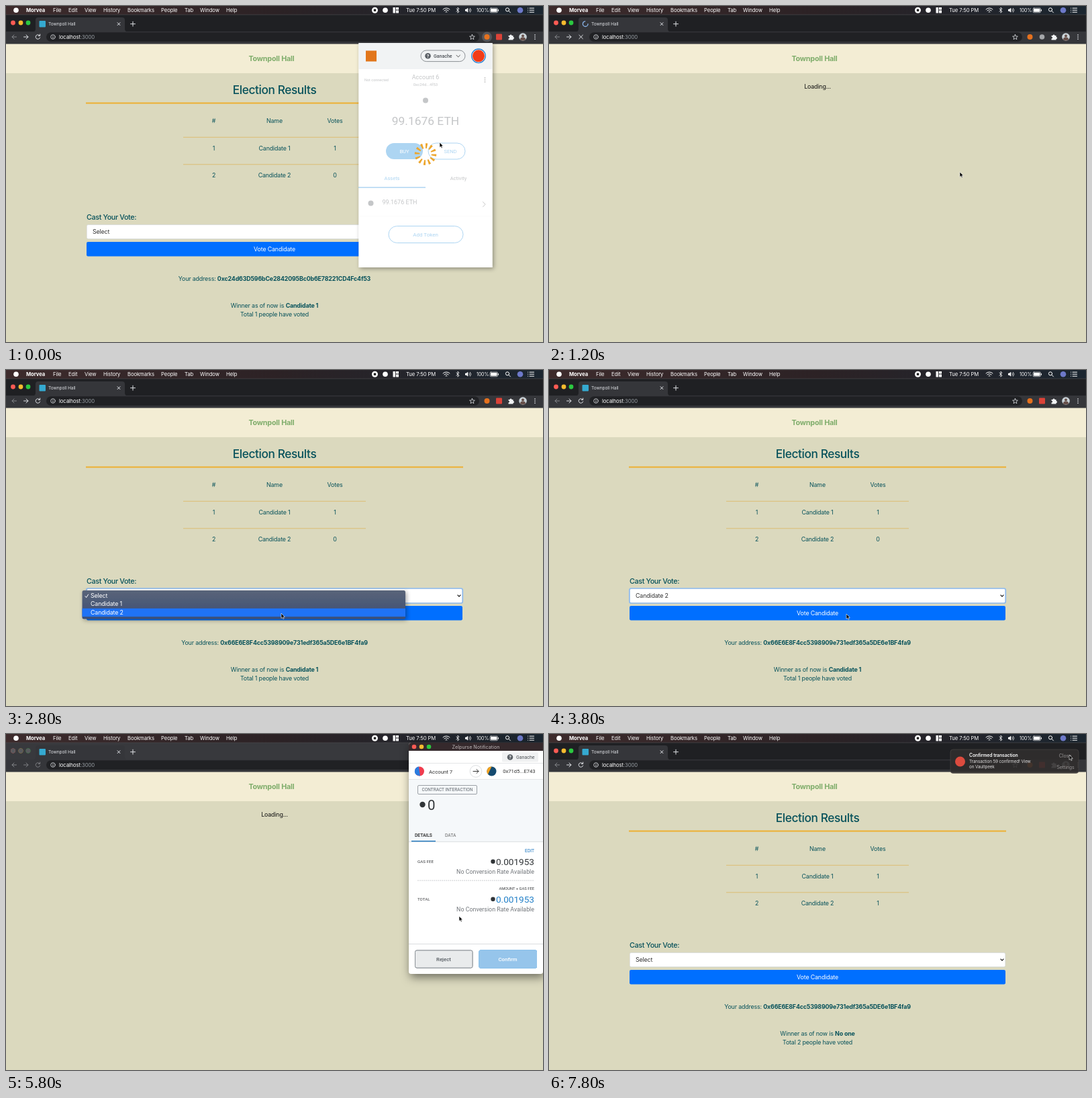
An HTML page for the animation above (8000 ms loop, 800x500 px).

```html
<!DOCTYPE html>
<html lang="en">
<head>
<meta charset="utf-8">
<title>Townpoll Hall</title>
<style>
html, body { margin: 0; width: 100%; height: 100%; overflow: hidden; background: #dbd9be }
svg { display: block; width: 100vw; height: 100vh }
text { font-family: Inter, "Open Sans", sans-serif; white-space: pre }
.ui { font-size: 7.7px; letter-spacing: -.1px; fill: #fff }
.page { font-size: 8.89px; letter-spacing: -.17px; fill: #07525b }
.wallet text { font-family: Roboto, "Open Sans", sans-serif }
.mid { text-anchor: middle }
.end { text-anchor: end }
.bold { font-weight: 700 }
.line { fill: none; stroke-linecap: round; stroke-linejoin: round }

/* The whole loop runs on a 200 ms beat: 2.5% of 8 s. */
.t { opacity: 0; animation: 8s step-end -5ms infinite }
.results { animation-name: results }
.oldAddr { animation-name: oldAddr }
.newAddr { animation-name: newAddr }
.before { animation-name: before }
.after { animation-name: after }
.popup { animation-name: popup }
.busy { animation-name: busy }
.ready { animation-name: ready }
.reload { animation-name: reload }
.steady { animation-name: steady }
.focus { animation-name: focus }
.unpicked { animation-name: unpicked }
.picked { animation-name: picked }
.menu { animation-name: menu }
.blur { animation-name: blur }
.nav { animation-name: nav }
.zoom { animation-name: zoom }
.window { animation-name: window }
.sent { animation-name: sent }
.notice { animation-name: notice }
.hover { animation-name: hover }
.row { animation: row 8s step-end -5ms infinite }
.cursor { animation: cursor 8s -5ms infinite }
.spin { transform-box: fill-box; transform-origin: center; animation: spin 1.2s steps(6) infinite }

@keyframes results { 0%, 20%, 87.5% { opacity: 1 } 12.5%, 50% { opacity: 0 } }
@keyframes oldAddr { 0% { opacity: 1 } 12.5% { opacity: 0 } }
@keyframes newAddr { 0% { opacity: 0 } 12.5% { opacity: 1 } }
@keyframes before { 0% { opacity: 1 } 87.5% { opacity: 0 } }
@keyframes after { 0% { opacity: 0 } 87.5% { opacity: 1 } }
@keyframes popup { 0% { opacity: 1 } 10% { opacity: 0 } }
@keyframes busy { 0% { opacity: 1 } 5% { opacity: 0 } }
@keyframes ready { 0% { opacity: 0 } 5% { opacity: 1 } }
@keyframes reload { 0%, 20% { opacity: 0 } 12.5% { opacity: 1 } }
@keyframes steady { 0%, 20% { opacity: 1 } 12.5% { opacity: 0 } }
@keyframes focus { 0%, 50% { opacity: 0 } 30% { opacity: 1 } }
@keyframes unpicked { 0%, 50% { opacity: 1 } 40% { opacity: 0 } }
@keyframes picked { 0%, 50% { opacity: 0 } 40% { opacity: 1 } }
@keyframes menu { 0%, 40% { opacity: 0 } 30% { opacity: 1 } }
@keyframes row { 0% { transform: none } 32.5% { transform: translateY(12.3px) } 35% { transform: translateY(24.8px) } }
@keyframes blur { 0%, 77.5% { opacity: 0 } 57.5% { opacity: 1 } }
@keyframes nav { 0%, 87.5% { opacity: 1 } 57.5% { opacity: .42 } }
@keyframes zoom { 0%, 62.5% { opacity: 0 } 60% { opacity: 1 } }
@keyframes window { 0%, 77.5% { opacity: 0 } 62.5% { opacity: 1 } }
@keyframes sent { 0% { opacity: 0 } 70% { opacity: 1 } }
@keyframes notice {
  0% { opacity: 0 }
  87.5% { opacity: 1; transform: translateX(110px) }
  90% { opacity: 1; transform: none }
}
@keyframes hover { 0% { opacity: 0 } 95% { opacity: 1 } }
@keyframes spin { to { transform: rotate(360deg) } }
@keyframes cursor {
  0%, 5% { transform: translate(646px, 203px); animation-timing-function: steps(2) }
  10%, 20% { transform: translate(612px, 247px); animation-timing-function: steps(4) }
  30% { transform: translate(420px, 336px); animation-timing-function: steps(2) }
  35%, 40% { transform: translate(410px, 362px); animation-timing-function: steps(2) }
  45%, 62.5% { transform: translate(443px, 363px); animation-timing-function: steps(2) }
  67.5%, 70% { transform: translate(745px, 331px); animation-timing-function: steps(1) }
  72.5% { transform: translate(675px, 271px); animation-timing-function: steps(4) }
  82.5%, 90% { transform: translate(600px, 246px); animation-timing-function: steps(3) }
  97.5%, 100% { transform: translate(775px, 31px) }
}
</style>
</head>
<body>
<svg viewBox="0 0 800 500" preserveAspectRatio="none">
  <defs>
    <linearGradient id="bar"><stop stop-color="#3d2b2c"/><stop offset=".5" stop-color="#2c2225"/><stop offset="1" stop-color="#1b2630"/></linearGradient>
    <linearGradient id="list" x2="0" y2="1"><stop stop-color="#596479"/><stop offset="1" stop-color="#3c4e74"/></linearGradient>
    <filter id="shadow" x="-20%" y="-20%" width="140%" height="140%"><feDropShadow dy="5" stdDeviation="7" flood-opacity=".5"/></filter>
    <filter id="soft" x="-10%" y="-30%" width="120%" height="180%"><feDropShadow dy="2" stdDeviation="3" flood-opacity=".35"/></filter>
    <g id="duo"><circle r="7" fill="#f03c4e"/><path d="M-1-7A7 7 0 0 0-4 5.8L1 7Z" fill="#2b7de0"/></g>
    <g id="help"><circle r="4.3" fill="#5b6066"/><text class="mid bold" y="2.3" font-size="6.5" fill="#fff">?</text></g>
    <g id="lights"><circle cx="10.5" cy="25"  r="3.4"/><circle cx="22" cy="25" r="3.4"/><circle cx="33" cy="25" r="3.4"/></g>
  </defs>

  <!-- Page -->
  <rect width="800" height="500" fill="#dbd9be"/>
  <rect y="56" width="800" height="44" fill="#f3edd4"/>
  <text class="mid bold" x="395.5" y="82" font-size="10.8" letter-spacing="-.2" fill="#7fad6b">Townpoll Hall</text>
  <text class="page mid" x="400" y="123.3" style="fill:#111">Loading...</text>

  <g class="t results page">
    <rect y="100" width="800" height="400" fill="#dbd9be"/>
    <text class="mid" x="400" y="130.5" font-size="17.3" letter-spacing="-.4" font-weight="500">Election Results</text>
    <path d="M119 144.5H681" stroke="#edb033" stroke-width="2.2"/>
    <path d="M264 195.3H536M264 235.8H536" stroke="#dcbd72"/>
    <g class="mid">
      <text x="309.5" y="174">#</text><text x="400" y="174">Name</text><text x="490" y="174">Votes</text>
      <text x="309.5" y="214.6">1</text><text x="400" y="214.6">Candidate 1</text><text x="490" y="214.6">1</text>
      <text x="309.5" y="255">2</text><text x="400" y="255">Candidate 2</text>
      <text class="t oldAddr" x="400" y="409">Your address: <tspan class="bold">0xc24d63D596bCe2842095Bc0b6E78221CD4Fc4f53</tspan></text>
      <text class="t newAddr" x="400" y="409">Your address: <tspan class="bold">0x66E6E8F4cc5398909e731edf365a5DE6e1BF4fa9</tspan></text>
      <g class="t before">
        <text x="490" y="255">0</text>
        <text x="400" y="449">Winner as of now is <tspan class="bold">Candidate 1</tspan></text>
        <text x="400" y="462.3">Total 1 people have voted</text>
      </g>
      <g class="t after">
        <text x="490" y="255">1</text>
        <text x="400" y="449">Winner as of now is <tspan class="bold">No one</tspan></text>
        <text x="400" y="462.3">Total 2 people have voted</text>
      </g>
    </g>
    <text x="120" y="318.3" font-size="10.8" letter-spacing="-.38" font-weight="500">Cast Your Vote:</text>
    <rect x="120.3" y="325.5" width="559.5" height="21" rx="2.2" fill="#fff" stroke="#ced4da" stroke-width=".6"/>
    <rect class="t focus" x="119.8" y="325" width="560.5" height="22" rx="2.5" fill="none" stroke="#8fbcf0" stroke-width="1.7"/>
    <g fill="#333"><text class="t unpicked" x="129" y="339.3">Select</text><text class="t picked" x="129" y="339.3">Candidate 2</text></g>
    <path class="line" d="M673 335l2 2.2 2-2.2" stroke="#222" stroke-width="1.2"/>
    <rect x="120" y="351" width="560" height="21.5" rx="2.2" fill="#006fff"/>
    <text class="mid" x="400" y="365.2" fill="#fff">Vote Candidate</text>

    <g class="t menu">
      <rect x="113.5" y="328" width="481.5" height="42.5" rx="2.5" fill="url(#list)" filter="url(#soft)"/>
      <rect class="row" x="113.5" y="330" width="481.5" height="12.3" fill="#1f73f6"/>
      <g fill="#fff">
        <path class="line" d="M118 336.6l1.6 2 3-4.6" stroke="#fff"/>
        <text x="126" y="339.2">Select</text><text x="126" y="351.4">Candidate 1</text><text x="126" y="363.7">Candidate 2</text>
      </g>
    </g>
  </g>

  <!-- Browser frame -->
  <rect y="13" width="800" height="26" fill="#1f2023"/>
  <rect class="t blur" y="13" width="800" height="26" fill="#38393d"/>
  <path d="M40 38.5Q44 38 44 34V21Q44 17 48 17H173Q177 17 177 21V34Q177 38 181 38.5Z" fill="#35363a"/>
  <rect y="38" width="800" height="18.5" fill="#35363a"/>
  <rect x="60" y="39.2" width="645" height="13.8" rx="6.9" fill="#202124"/>
  <circle cx="10.5" cy="25" r="3.4" fill="#fb5b54"/><circle cx="22" cy="25" r="3.4" fill="#f6bb2f"/><circle cx="33" cy="25" r="3.4" fill="#2bc840"/>
  <use href="#lights" class="t blur" fill="#58595d"/>
  <rect class="t steady" x="49.5" y="22" width="9.5" height="9.5" rx="1" fill="#35a9d0"/>
  <g class="t reload"><circle cx="54.2" cy="26.7" r="4.8" fill="#35363a"/><circle class="spin line" cx="54.2" cy="26.7" r="3.8" stroke="#8cb8ee" stroke-width="1.3" stroke-dasharray="17 7"/></g>
  <text class="ui" x="63" y="29.2" style="font-size:6.6px;fill:#dfe1e5">Townpoll Hall</text>
  <g class="line" stroke="#dfe1e5" stroke-width="1">
    <path d="M166 24.7l4 4m0-4l-4 4M185.5 26.7h7m-3.5-3.5v7"/>
    <path d="M15.5 46H9m3-3l-3 3 3 3" stroke="#85878b"/>
    <g class="t nav">
      <path d="M26.5 46H33m-3-3l3 3-3 3"/>
      <path class="t steady" d="M50.2 44a3.3 3.3 0 1 0 .5 3M50.7 42v2.4h-2.4"/>
      <path class="t reload" d="M44.8 43.2l5.6 5.6m0-5.6l-5.6 5.6"/>
    </g>
    <circle cx="70" cy="46" r="3.3" stroke-width=".8"/><path d="M70 45.8v2M70 44.2v.1" stroke-width=".9"/>
    <path d="M694.5 42.4l1.1 2.6 2.8.2-2.2 1.8.7 2.8-2.4-1.6-2.4 1.6.7-2.8-2.2-1.8 2.8-.2Z" stroke-width=".8"/>
  </g>
  <text class="ui" x="79" y="48.9">localhost<tspan fill="#9aa0a6">:3000</tspan></text>
  <circle class="t popup" cx="716.5" cy="46" r="7.5" fill="#55565a"/>
  <circle cx="716.5" cy="46" r="4" fill="#e5711e"/>
  <g class="t blur"><rect x="717" y="46.5" width="7" height="7" rx="1.5" fill="#1675d1"/><text class="mid ui" x="720.5" y="52.2" style="font-size:5.5px">1</text></g>
  <rect class="t steady" x="730" y="41.5" width="9" height="9" rx="1" fill="#dc4338"/>
  <circle class="t reload" cx="734.5" cy="46" r="3.8" fill="#a5a7aa"/>
  <path d="M748.5 44h2a1.5 1.5 0 1 1 3 0h2v2a1.5 1.5 0 1 1 0 3v1.5h-7v-2a1.5 1.5 0 0 0 0-3Z" fill="#f1f3f4"/>
  <circle cx="770" cy="46" r="5.8" fill="#c9d2d7"/><circle cx="770" cy="44.5" r="2" fill="#67504a"/><path d="M766 50a4 3.4 0 0 1 8 0Q770 53 766 50" fill="#67504a"/>
  <path class="line" d="M788 43v.1M788 46v.1M788 49v.1" stroke="#dfe1e5" stroke-width="1.7"/>

  <!-- Menu bar -->
  <rect width="800" height="13" fill="url(#bar)"/>
  <rect y="12.6" width="800" height=".7" fill="#49494d"/>
  <g class="ui">
    <circle cx="15" cy="6.2" r="3.8"/>
    <text class="bold" x="30" y="9">Morvea</text><text x="70" y="9">File</text><text x="93" y="9">Edit</text><text x="117" y="9">View</text>
    <text x="145" y="9">History</text><text x="181" y="9">Bookmarks</text><text x="231" y="9">People</text><text x="266" y="9">Tab</text>
    <text x="289" y="9">Window</text><text x="328" y="9">Help</text><text x="596" y="9">Tue 7:50 PM</text><text x="701" y="8.8" font-size="7" style="font-size:7px">100%</text>
    <circle cx="549.5" cy="6.2" r="4.5"/><rect x="547.8" y="4.5" width="3.4" height="3.4" rx=".6" fill="#222"/>
    <circle cx="565" cy="6.2" r="3.8"/>
    <path d="M576.5 2h3.6v8.5h-3.6ZM581 2h4v3.6h-4ZM581 6.6h4v3.9h-4Z"/>
    <path d="M684 4.8h1.8l2.4-2v7l-2.4-2H684Z"/>
    <rect x="722" y="4" width="9.5" height="4.8" rx=".8"/><rect x="733" y="5.3" width="1" height="2.2"/>
    <circle cx="766" cy="6.2" r="4.3" fill="#6d79c9"/>
    <g class="line" stroke="#fff" stroke-width="1">
      <path d="M651 5a7 7 0 0 1 10 0M652.8 7a4.5 4.5 0 0 1 6.4 0M655 8.8a1.8 1.8 0 0 1 2 0"/>
      <path d="M671 4l4 4.2-2 2V2.2l2 2-4 4" stroke-width=".8"/>
      <path d="M690 4.7a2.4 2.4 0 0 1 0 3.2M691.6 3.4a4.5 4.5 0 0 1 0 5.8" stroke-width=".8"/>
      <rect x="721" y="3" width="11.5" height="6.8" rx="1.5" stroke-width=".6"/>
      <circle cx="747" cy="5.4" r="2.6"/><path d="M749 7.4l2.5 2.5M777.5 3.2h.1M777.5 6.2h.1M777.5 9.2h.1M780 3.2h6.5M780 6.2h6.5M780 9.2h6.5"/>
    </g>
  </g>

  <!-- Wallet popup -->
  <g class="t popup wallet">
    <rect x="525.5" y="55" width="199" height="334" fill="#fff" filter="url(#soft)"/>
    <rect x="525.5" y="55" width="199" height="39" fill="#f1f3f4"/>
    <rect x="536" y="66.5" width="16" height="16" fill="#e2761b"/>
    <rect x="618" y="66" width="66" height="16.6" rx="8.3" fill="none" stroke="#71777c" stroke-width=".8"/>
    <use href="#help" x="628.5" y="74.3"/>
    <text x="637" y="76.8" font-size="7" fill="#4d5156" font-weight="500">Ganache</text>
    <path class="line" d="M671 73.2l2.7 2.7 2.7-2.7" stroke="#555"/>
    <circle cx="704" cy="74.3" r="10.3" fill="#fff" stroke="#2f86d4" stroke-width="1.4"/>
    <circle class="t busy" cx="704" cy="74.3" r="9" fill="#f33c18"/>
    <g class="t ready"><use href="#duo" transform="translate(704 74.3) scale(1.25)"/></g>
    <g class="mid" fill="#4a4f55">
      <text x="552" y="111.5" font-size="5.5">Not connected</text>
      <path class="line" d="M713.5 107v.1M713.5 110v.1M713.5 113v.1" stroke="#555" stroke-width="2"/>
      <circle cx="625" cy="140.5" r="4"/>
      <g class="t busy"><text x="625" y="109" font-size="9">Account 6</text><text x="625" y="118.5" font-size="6">0xc24d...4f53</text><text x="625" y="177.3" font-size="17.4">99.1676 ETH</text><text x="586.5" y="295.2" font-size="9">99.1676 ETH</text></g>
      <g class="t ready"><text x="625" y="109" font-size="9">Account 7</text><text x="625" y="118.5" font-size="6">0x66E6...4fa9</text><text x="625" y="177.3" font-size="17.4">100 ETH</text><text x="579" y="295.2" font-size="9">100 ETH</text></g>
      <rect x="566" y="204" width="55" height="24" rx="12" fill="#037dd6"/><text x="593.5" y="218.8" font-size="7.6" fill="#fff">BUY</text>
      <rect x="629" y="204" width="55" height="24" rx="12" fill="none" stroke="#037dd6"/><text x="662" y="218.8" font-size="7.6" fill="#037dd6">SEND</text>
      <text x="575" y="258.5" font-size="7.5" fill="#037dd6">Assets</text><text x="674" y="258.5" font-size="7.5">Activity</text>
      <path d="M525.5 270H625" stroke="#037dd6" stroke-width="1.5"/><path d="M525.5 313H724.5" stroke="#e4e6e8" stroke-width=".6"/>
      <circle cx="543.5" cy="293.5" r="4"/><path class="line" d="M710.5 291.5l3.5 3.7-3.5 3.7" stroke="#555"/>
      <rect x="570" y="327.5" width="111" height="25" rx="12.5" fill="none" stroke="#037dd6"/><text x="625" y="342.8" font-size="8" fill="#037dd6">Add Token</text>
    </g>
    <g class="t busy">
      <rect x="525.5" y="94" width="199" height="295" fill="#fff" opacity=".68"/>
      <g class="spin"><circle cx="625" cy="220.5" r="12.5" fill="none" stroke="#eda62d" stroke-width="7.5" pathLength="120" stroke-dasharray="4 6"/></g>
    </g>
  </g>

  <!-- Transaction window -->
  <rect class="t zoom" x="685" y="160" width="30" height="51" rx="1" fill="#bfbea8"/>
  <g class="t window wallet">
    <rect x="600" y="13" width="200" height="344" rx="4" fill="#fff" filter="url(#shadow)"/>
    <path d="M600 25V17Q600 13 604 13H800V25Z" fill="#35292c"/>
    <circle cx="608" cy="19" r="3.3" fill="#fb5b54"/><circle cx="619" cy="19" r="3.3" fill="#f6bb2f"/><circle cx="630" cy="19" r="3.3" fill="#2bc840"/>
    <text class="mid" x="700" y="21.6" font-size="7.2" fill="#bcb6b7" style="font-family:Inter,sans-serif">Zelpurse Notification</text>
    <rect x="739" y="27.5" width="54" height="14" rx="1.5" fill="#f0f1f2"/>
    <use href="#help" x="751" y="34.5"/>
    <text x="760" y="37.2" font-size="7" fill="#4d5156">Ganache</text>
    <path d="M600 43.5H800M600 67.5H800" stroke="#d8dbdf" stroke-width=".7"/>
    <use href="#duo" x="616" y="55.5"/><text x="630" y="58.5" font-size="7.8" fill="#333">Account 7</text>
    <circle cx="700" cy="55.5" r="8.8" fill="#fff" stroke="#d2d5d9" stroke-width=".8"/><path class="line" d="M696 55.5h8m-3-3l3 3-3 3" stroke="#333"/>
    <circle cx="723.5" cy="55.5" r="7" fill="#154b70"/><path d="M723.5 48.5A7 7 0 0 0 718 60Z" fill="#f1a11f"/>
    <text class="end" x="788.5" y="58.3" font-size="7.6" fill="#333">0x71d5...E743</text>
    <rect x="600" y="68" width="200" height="92" fill="#f5f8fa"/>
    <rect x="613.5" y="76.5" width="88" height="13" rx="1.5" fill="none" stroke="#858b91" stroke-width=".8"/>
    <text class="mid" x="657.5" y="85.4" font-size="6.5" fill="#60666c">CONTRACT INTERACTION</text>
    <circle cx="620.5" cy="105" r="4.2" fill="#303437"/><text x="628" y="113" font-size="20.5" fill="#303437">0</text>
    <text x="609" y="152.8" font-size="6.7" font-weight="500" fill="#222">DETAILS</text><text x="654" y="152.8" font-size="6.7" fill="#666">DATA</text>
    <path d="M600 160.3H800" stroke="#d2d5d8" stroke-width=".8"/><path d="M604 159.5H640" stroke="#2277bd" stroke-width="1.5"/>
    <g fill="#37393c" font-size="6.2"><text x="613" y="192.2">GAS FEE</text><text x="613" y="248.4">TOTAL</text></g>
    <g class="end">
      <text x="787" y="175.5" font-size="6.7" fill="#1b76c0">EDIT</text>
      <text x="787" y="194.6" font-size="13.6" fill="#303437">0.001953</text>
      <text x="787" y="207.8" font-size="8.9" fill="#72767b">No Conversion Rate Available</text>
      <text x="787" y="231.8" font-size="5.8" fill="#37393c">AMOUNT + GAS FEE</text>
      <text x="787" y="250.8" font-size="13.6" fill="#2380c8">0.001953</text>
      <text x="787" y="264" font-size="8.9" fill="#72767b">No Conversion Rate Available</text>
    </g>
    <circle cx="725.5" cy="189.7" r="3.2" fill="#303437"/><circle cx="725.5" cy="245.8" r="3.2" fill="#303437"/>
    <path d="M613 218H787" stroke="#b5b8bc" stroke-width=".7" stroke-dasharray="2 1"/><path d="M600 312.5H800" stroke="#d2d5d8" stroke-width=".8"/>
    <rect x="609.5" y="322" width="85.5" height="26" rx="2.5" fill="#fff" stroke="#8b9197"/>
    <rect x="704.5" y="321.5" width="86.5" height="27" rx="2.5" fill="#037dd6"/>
    <g class="t sent"><rect x="609.5" y="322" width="85.5" height="26" rx="2.5" fill="#e9ebec" stroke="#8b9197"/><rect x="704.5" y="321.5" width="86.5" height="27" rx="2.5" fill="#96c5eb"/></g>
    <g class="mid" font-size="7.8" font-weight="500"><text x="652" y="337.8" fill="#555b61">Reject</text><text x="747.5" y="337.8" fill="#fff">Confirm</text></g>
  </g>

  <!-- Notification -->
  <g class="t notice ui">
    <rect x="598" y="23" width="191" height="35.5" rx="4" fill="#302e2e" fill-opacity=".9" stroke="#55504e" stroke-width=".5"/>
    <circle cx="612.5" cy="41" r="7.5" fill="#dd4b3e"/>
    <text x="626" y="33.7" font-weight="600" style="font-size:6.9px">Confirmed transaction</text>
    <g style="font-size:6.3px" fill="#e2e0e0"><text x="626" y="43.3">Transaction 59 confirmed! View</text><text x="626" y="51">on Vaultpeek</text></g>
    <g class="t hover mid" style="font-size:7px" fill="#969393"><text x="769" y="34.7">Close</text><text x="769.5" y="52.3">Settings</text></g>
  </g>

  <path class="cursor" d="M0 0V7.4L1.7 5.9 2.9 8.6 4.2 8 3 5.4H5.3Z" stroke="#fff" stroke-width=".6" fill="#000"/>
</svg>
</body>
</html>
```
